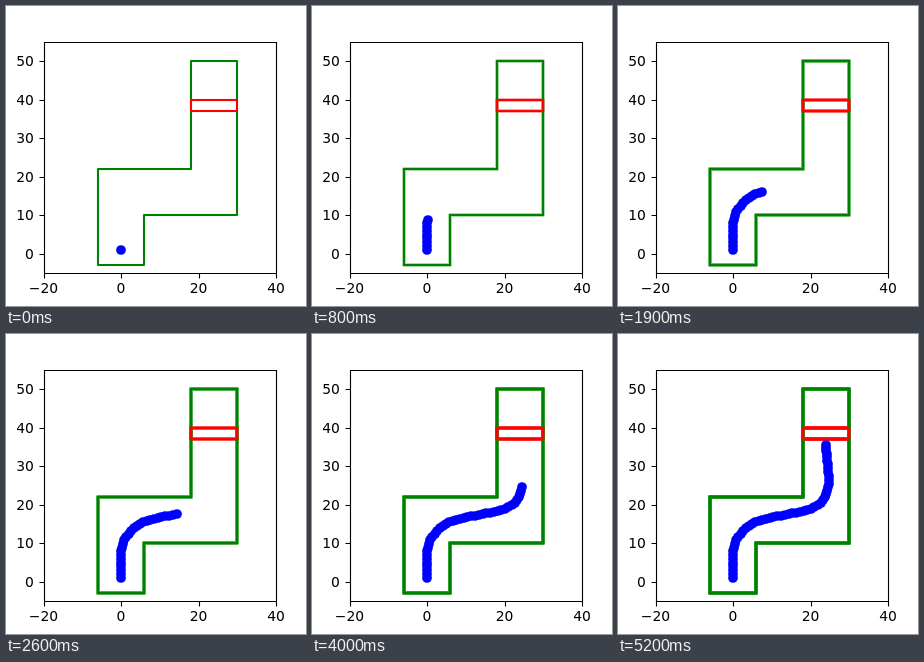
Recreate the animation shown at these times as an HTML page. Size 300 by 300 pixels, loop 5.4 s.

```html
<!DOCTYPE html>
<html lang="en">
<head>
<meta charset="utf-8">
<title>Path plot</title>
<style>
  html, body { margin: 0; width: 100%; height: 100%; overflow: hidden; background: #fff; }
  svg { display: block; width: 100vw; height: 100vh; }
  text { font: 13.89px "DejaVu Sans", sans-serif; fill: #000; }
</style>
</head>
<body>
<svg id="plot" viewBox="0 0 300 300"></svg>
<script>
const STEP = 100, STEPS = 53, LOOP = 5400;
const KNOT_GAP = 4;
// Route in pixels, one knot every KNOT_GAP steps
const KNOTS = [
  [115, 243.9], [115, 228.5], [115.6, 213.6], [122.6, 200], [133.8, 190],
  [148, 185], [163, 181.5], [178, 178.7], [193, 174.8], [205, 166],
  [210.3, 153.3], [210.4, 138.3], [209, 123], [208, 111]
];
const ROOM = [[-6, -3], [-6, 22], [18, 22], [18, 50], [30, 50], [30, 10], [6, 10], [6, -3]];
const GOAL = [[18, 40], [30, 40], [30, 37], [18, 37]];

const svg = document.getElementById('plot');
const px = x => 115 + x * 3.875;
const py = y => 247.75 - y * 3.85;

function add(parent, name, attrs, text) {
  const el = document.createElementNS('http://www.w3.org/2000/svg', name);
  for (const key in attrs) el.setAttribute(key, attrs[key]);
  if (text !== undefined) el.textContent = text;
  parent.appendChild(el);
  return el;
}

const label = n => String(n).replace('-', '\u2212');

function drawAxes() {
  let d = 'M38.5 36.5H270.5V267.5H38.5Z';
  for (let x = -20; x <= 40; x += 20) {
    d += `M${Math.round(px(x)) + 0.5} 267.5v5`;
    add(svg, 'text', { x: px(x), y: 287, 'text-anchor': 'middle' }, label(x));
  }
  for (let y = 0; y <= 50; y += 10) {
    d += `M38.5 ${Math.round(py(y)) + 0.5}h-5`;
    add(svg, 'text', { x: 27.8, y: Math.round(py(y) + 5), 'text-anchor': 'end' }, label(y));
  }
  add(svg, 'path', { d, fill: 'none', stroke: '#000', 'stroke-width': 1.11 });
}

// Each outline has a faint fringe that builds up as layers stack
function outline(parent, pts, stroke) {
  const points = pts.map(([x, y]) => [Math.round(px(x)), Math.round(py(y))]).join(' ');
  const base = { points, stroke, fill: 'none', 'stroke-linejoin': 'round' };
  add(parent, 'polygon', { ...base, 'stroke-width': 4, 'stroke-opacity': 0.0417 });
  add(parent, 'polygon', { ...base, 'stroke-width': 2 });
}

function knot(i, axis) {
  const last = KNOTS.length - 1;
  if (i < 0) return 2 * KNOTS[0][axis] - KNOTS[1][axis];
  if (i > last) return 2 * KNOTS[last][axis] - KNOTS[last - 1][axis];
  return KNOTS[i][axis];
}

// Catmull-Rom position after a number of steps
function along(step, axis) {
  const i = Math.min(Math.floor(step / KNOT_GAP), KNOTS.length - 2);
  const u = step / KNOT_GAP - i;
  const [a, b, c, e] = [-1, 0, 1, 2].map(j => knot(i + j, axis));
  return b + 0.5 * u * (c - a + u * (2 * a - 5 * b + 4 * c - e + u * (3 * (b - c) + e - a)));
}

drawAxes();

const layers = Array.from({ length: STEPS }, (_, k) => {
  const g = add(svg, 'g', {});
  add(g, 'circle', {
    cx: Math.round(along(k, 0)), cy: Math.round(along(k, 1)), r: 4.86, fill: '#00f'
  });
  outline(g, ROOM, '#008000');
  outline(g, GOAL, '#f00');
  return g;
});

let shown = -1;
function render(time) {
  const k = Math.min(STEPS - 1, Math.floor((time % LOOP) / STEP));
  if (k === shown) return;
  shown = k;
  layers.forEach((g, i) => { g.style.display = i <= k ? '' : 'none'; });
}

const start = performance.now();
function tick() {
  render(performance.now() - start);
  requestAnimationFrame(tick);
}
tick();
</script>
</body>
</html>
```
